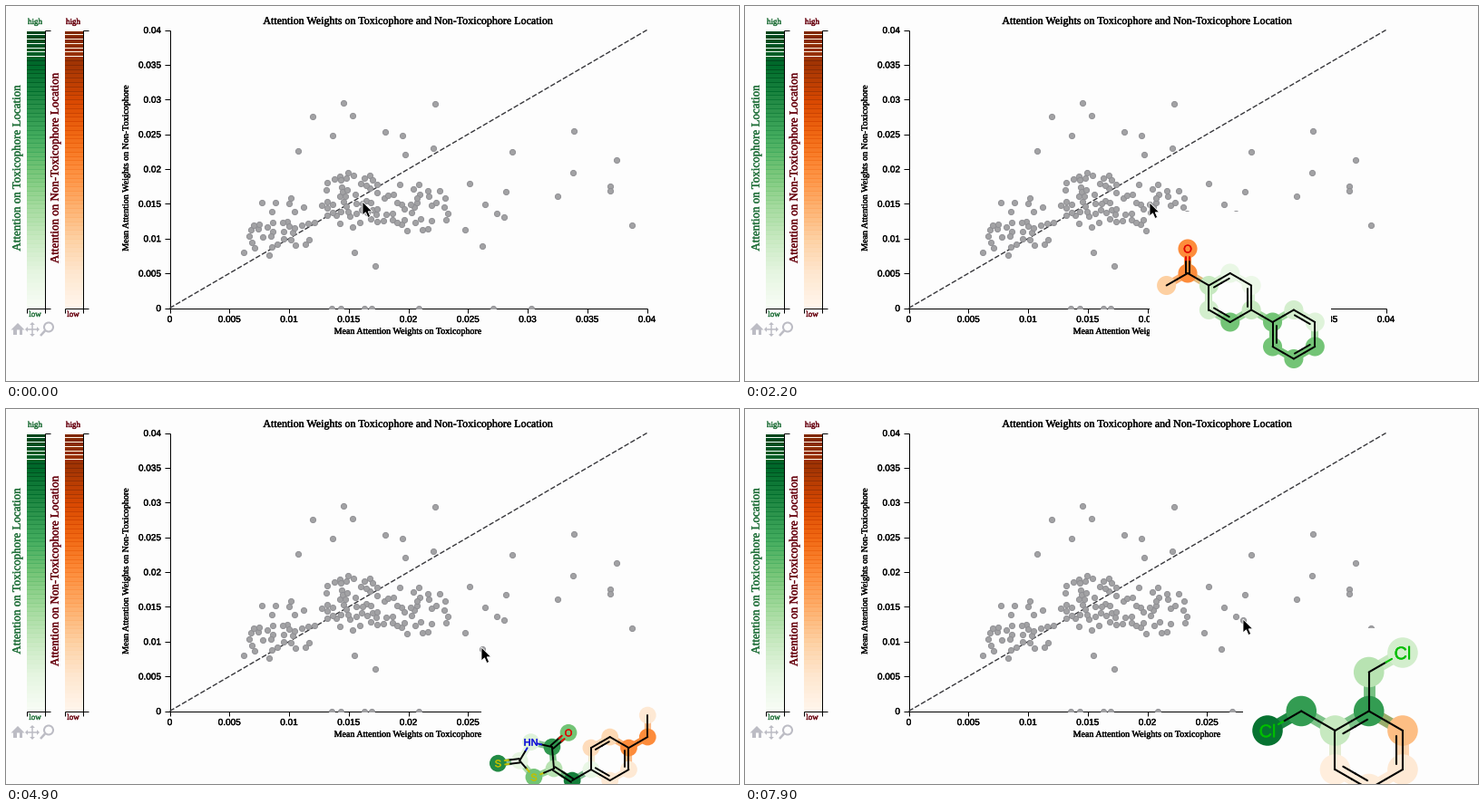
Write a matplotlib script that moves like this. It is 808 by 414 pixels and loops after 8000 ms.

```python
import numpy as np
import matplotlib.pyplot as plt
from matplotlib.animation import FuncAnimation
from matplotlib.patches import Circle, Ellipse, Polygon, Rectangle
from matplotlib.patheffects import withStroke

W, H, DPI = 808, 414, 72
FRAMES, STEP = 80, 100
PAPER = "#fdfdfd"
SERIF, SANS = "Liberation Serif", "Liberation Sans"
LEFT, RIGHT, TOP, BASE = 180.5, 706.5, 26.5, 333.5
GREENS, ORANGES = plt.get_cmap("Greens"), plt.get_cmap("Oranges")
plt.rcParams["text.hinting"] = "none"

fig = plt.figure(figsize=(W / DPI, H / DPI), dpi=DPI, facecolor=PAPER)
ax = fig.add_axes([0, 0, 1, 1])
ax.set_xlim(0, W)
ax.set_ylim(H, 0)
ax.axis("off")


def line(p, q, color="black", lw=1.0, z=2, **kw):
    kw.setdefault("solid_capstyle", "butt")
    return ax.plot([p[0], q[0]], [p[1], q[1]], color=color, lw=lw, zorder=z, **kw)[0]


def text(x, y, s, size, color="black", font=SERIF, ha="center", va="baseline", z=3, **kw):
    bolder = [withStroke(linewidth=0.35, foreground=color)]
    return ax.text(x, y, s, fontsize=size, color=color, family=font, ha=ha, va=va,
                   zorder=z, path_effects=bolder, **kw)


def patch(p, z):
    p.set_zorder(z)
    return ax.add_patch(p)


def heading(deg):
    a = np.radians(deg)
    return np.array([np.cos(a), -np.sin(a)])


# ---- colour bars ----
def color_bar(x, cmap, ink, label, label_x, bands=64):
    h = (BASE - TOP) / bands
    for i in range(bands):
        t = 1 - i / (bands - 1)
        y = TOP + i * h
        patch(Rectangle((x, y), 20, h + 0.4, fc=cmap(t), ec="none"), 1)
        patch(Rectangle((x, y), 20, 1, fc=cmap(min(1, t * 1.12)), ec="none"), 1.1)
    r = x + 20
    line((r, TOP), (r, BASE + 5))
    line((x, BASE), (x, BASE + 5))
    line((x, BASE), (r + 6, BASE))
    line((r, TOP), (r + 6, TOP))
    text(x + 9.5, 20, "high", 9, ink)
    text(x + 9.5, 343, "low", 9, ink)
    text(label_x, 179, label, 13, ink, va="center", rotation=90)


color_bar(22.5, GREENS, "#1f6f38", "Attention on Toxicophore Location", 12.5)
color_bar(64.5, ORANGES, "#67000d", "Attention on Non-Toxicophore Location", 54.5)

# ---- toolbar ----
TOOL = "#bcbcc4"
patch(Polygon([(5.5, 357.5), (13, 350), (20.5, 357.5)], fc=TOOL, ec="none"), 2)
for x in (8, 14.5):
    patch(Rectangle((x, 357), 3.5, 6, fc=TOOL, ec="none"), 2)
hub = np.array([29, 357])
for a in range(0, 360, 90):
    line(hub, hub + 7 * heading(a), TOOL, 1.5)
    patch(Polygon([hub + 8 * heading(a), hub + 5.8 * heading(a + 30),
                   hub + 5.8 * heading(a - 30)], fc=TOOL, ec="none"), 2)
patch(Circle((47, 354.5), 5, fc="none", ec=TOOL, lw=2), 2)
line((43, 358.5), (38, 364), TOOL, 2.5)

# ---- plot frame ----
text(443, 20, "Attention Weights on Toxicophore and Non-Toxicophore Location", 12)
text(443, 362, "Mean Attention Weights on Toxicophore", 10)
text(132.5, 179, "Mean Attention Weights on Non-Toxicophore", 10, va="center", rotation=90)
line((LEFT, TOP), (LEFT, BASE))
line((LEFT, BASE), (RIGHT, BASE))
for k in range(9):
    x = LEFT + (RIGHT - LEFT) * k / 8
    y = BASE + (TOP - BASE) * k / 8
    name = f"{0.005 * k:g}"
    line((x, BASE), (x, BASE + 5))
    line((LEFT - 6, y), (LEFT, y))
    text(x, 349, name, 10, font=SANS)
    text(171, y + 3.5, name, 10, font=SANS, ha="right")
line((LEFT, BASE), (RIGHT, TOP), "#38383c", 1.4, dashes=(4, 1.6), dash_capstyle="butt")

# ---- scatter: a few outliers, then seeded clouds ----
OUTLIERS = [
    (371, 106), (337, 121), (381, 120), (472, 107), (417, 138), (359, 142), (436, 142),
    (321, 159), (470, 156), (439, 163), (557, 160), (625, 137), (624, 183), (672, 169),
    (665, 198), (665, 203), (689, 241), (607, 209), (550, 204), (540, 228), (548, 232),
    (527, 218), (510, 195), (505, 246), (524, 264), (406, 286), (383, 271), (261, 271)]
ON_AXIS = [358, 368, 394, 402, 454, 536, 578]
# count, centre, radii
CLOUDS = [(36, 302, 244, 40, 34), (46, 380, 212, 33, 33), (40, 443, 222, 52, 27)]

rng = np.random.default_rng(11)
dots = [np.array(p) for p in OUTLIERS + [(x, 333) for x in ON_AXIS]]
for count, cx, cy, rx, ry in CLOUDS:
    while count:
        r = np.sqrt(rng.uniform())
        p = (cx, cy) + r * heading(rng.uniform(0, 360)) * (rx, ry)
        if min(np.hypot(*(p - q)) for q in dots) > 5:
            dots.append(p)
            count -= 1
dots = np.array(dots) + 0.5
cloud = ax.scatter(*dots.T, s=6.2 ** 2, fc="#a2a2a4", ec="#8e8e92", lw=0.9, zorder=4)
cloud.set_clip_path(Rectangle((LEFT, TOP), RIGHT - LEFT, BASE - TOP + 0.5,
                              transform=ax.transData))

# ---- molecules ----
INK = {"O": "#e00000", "N": "#1010d8", "NH": "#1010d8", "HN": "#1010d8",
       "N⁺": "#1010d8", "Cl": "#00be00", "Cl⁻": "#00be00", "S": "#c0c000"}


def tint(tone):
    """Positive attention is green, negative orange."""
    return np.array((GREENS if tone > 0 else ORANGES)(abs(tone)))


class Molecule:
    """Tooltip drawing, grown atom by atom along bond headings."""

    def __init__(self, tip, size, start, tone, label=""):
        self.size, self.pos, self.names, self.tones = size, [], [], []
        self.parts = [patch(Rectangle((tip[0], tip[1] + 10), 200, 200, fc=PAPER,
                                      ec="none"), 6)]
        self.atom(np.array(start, float), tone, label)

    def atom(self, p, tone, label):
        self.pos.append(p)
        self.names.append(label)
        self.tones.append(tone)
        r = 0.39 * self.size
        tall = label == "NH"
        halo = Ellipse((p[0], p[1] + 0.3 * self.size * tall), 2 * r, 2 * r * (1 + tall),
                       fc=tint(tone), ec="none")
        self.parts.append(patch(halo, 8))
        for k, s in enumerate(label if tall else [label]):
            self.parts.append(text(p[0], p[1] + 0.5 * self.size * k, s, 0.46 * self.size,
                                   INK.get(label, "black"), SANS, va="center_baseline",
                                   z=10))
        return len(self.pos) - 1

    def grow(self, i, deg, tone, label="", order=1):
        j = self.atom(self.pos[i] + self.size * heading(deg), tone, label)
        self.bond(i, j, order)
        return j

    def chain(self, i, *steps):
        for deg, tone in steps:
            i = self.grow(i, deg, tone)
        return i

    def ring(self, i, deg, turn, tones, labels=None, phase=None):
        """Closed walk from atom i; with a phase, every other bond is double."""
        ids = [i]
        for k, tone in enumerate(tones):
            step = self.size * heading(deg + turn * k)
            ids.append(self.atom(self.pos[ids[-1]] + step, tone, (labels or {}).get(k, "")))
        center = np.mean([self.pos[k] for k in ids], axis=0)
        for k, a in enumerate(ids):
            double = phase is not None and k % 2 == phase
            self.bond(a, ids[(k + 1) % len(ids)], inner=center if double else None)
        return ids

    def benzene(self, i, deg, tones, phase):
        return self.ring(i, deg + 60, -60, tones, phase=phase)

    def bond(self, i, j, order=1, inner=None):
        p, q = self.pos[i], self.pos[j]
        n = heading(90) if p[0] == q[0] else (q - p)
        n = (q - p)[::-1] * (-1, 1) * 0.13
        self.parts.append(line(p, q, (tint(self.tones[i]) + tint(self.tones[j])) / 2,
                               0.3 * self.size, 7))
        shifts = {1: [0], 2: [-0.7, 0.7], 3: [-1, 0, 1]}[order]
        for s in shifts:
            self.stroke(i, j, s * n)
        if inner is not None:
            side = np.sign(n @ (inner - (p + q) / 2))
            self.stroke(i, j, 1.3 * side * n, 0.14)

    def stroke(self, i, j, shift, trim=0.0):
        p, q = self.pos[i] + shift, self.pos[j] + shift
        mid = (p + q) / 2
        for end, k in ((p, i), (q, j)):
            cut = 0.32 if self.names[k] else trim
            self.parts.append(line(end + 2 * cut * (mid - end), mid,
                                   INK.get(self.names[k], "black"), 1.7 + self.size / 110,
                                   9, solid_capstyle="round"))


def carbamate(tip):
    m = Molecule(tip, 16.4, (392, 341), 0.65, "N⁺")
    for deg, tone in ((115, 0.3), (62, 0.3), (205, 0.15)):
        m.grow(0, deg, tone)
    m.atom(np.array([391, 357]), 0.08, "Cl⁻")
    c = m.chain(0, (-25, 0.15), (30, -0.35))
    c = m.grow(c, 30, -0.4, order=3)
    c = m.chain(c, (30, -0.4))
    c = m.grow(m.grow(c, -30, 0.5, "O"), 30, 0.25)
    m.grow(c, 90, 0.5, "O", order=2)
    c = m.grow(m.grow(c, -30, 0.65, "NH"), 30, -0.85)
    ids = m.benzene(c, 30, [-0.3, -0.4, -0.4, -0.4, -0.3], 0)
    m.grow(ids[4], -30, -0.4, "Cl")
    return m


def biphenyl(tip):
    m = Molecule(tip, 27, (488, 268), -0.5, "O")
    c = m.grow(0, -90, -0.5, order=2)
    m.grow(c, 210, -0.25)
    ids = m.benzene(m.grow(c, -30, 0.25), -30, [0.1, 0.08, 0.25, 0.5, 0.2], 0)
    m.benzene(m.grow(ids[3], -30, 0.5), -30, [0.2, 0.15, 0.5, 0.5, 0.5], 1)
    return m


def chloride(tip):
    m = Molecule(tip, 43.5, (642, 337.5), 0.55)
    m.grow(0, 90, 0.42, "O", order=2)
    m.grow(0, -30, 0.42, "Cl")
    n = m.grow(0, 210, 0.58, "N")
    m.chain(n, (150, 0.42), (210, -0.3))
    m.chain(n, (-90, 0.82), (210, -0.1))
    return m


def thiazole(tip):
    m = Molecule(tip, 24, (604, 397), 0.3)
    ids = m.ring(0, 95, 72, [0.7, 0.15, 0.12, 0.5], {1: "HN", 3: "S"})
    m.grow(ids[1], 41, 0.5, "O", order=2)
    m.grow(ids[3], 187, 0.75, "S", order=2)
    c = m.grow(0, -33, 0.8, order=2)
    ring = m.benzene(m.grow(c, 30, 0.1), 30, [-0.18, -0.2, -0.5, -0.1, -0.1], 1)
    m.chain(ring[3], (30, -0.5), (90, -0.1))
    return m


def nitrile(tip):
    m = Molecule(tip, 31, (558.5, 377), 0.52, "N")
    c = m.chain(m.grow(0, 30, 0.45, order=3), (30, 0.7))
    c = m.chain(m.grow(c, -30, 0.22, order=2), (30, -0.45))
    m.benzene(c, 30, [-0.25, -0.12, -0.08, -0.22, -0.08], 1)
    return m


def xylene(tip):
    m = Molecule(tip, 43, (576, 355), 0.85, "Cl")
    c = m.chain(0, (30, 0.68), (-30, 0.25))
    ids = m.benzene(c, -30, [0.68, -0.32, -0.1, -0.08, -0.06], 0)
    m.grow(m.chain(ids[1], (90, 0.3)), 30, 0.2, "Cl")
    return m


# drawing, pointer tip, first and last step of the hover
VISITS = [
    (None, (393, 216), 0, 1), (carbamate, (363, 217), 6, 15),
    (biphenyl, (446, 217), 19, 25), (chloride, (505, 248), 29, 39),
    (thiazole, (524, 263), 46, 51), (nitrile, (539, 228), 55, 63),
    (xylene, (549, 232), 65, FRAMES)]
TOOLTIPS = [(make(tip).parts, a, b) for make, tip, a, b in VISITS if make]

# ---- pointer ----
ARROW = np.array([(0, 0), (0, 15), (3.5, 11.8), (6, 17.5), (8.6, 16.3), (6.2, 10.8),
                  (10.8, 10.8)])
pointer = patch(Polygon(ARROW, fc="black", ec="white", lw=0.8), 20)


def pointer_at(i):
    spot = np.array(VISITS[0][1], float)
    for (_, p, _, leave), (_, q, arrive, _) in zip(VISITS, VISITS[1:]):
        u = np.clip((i - leave) / (arrive - leave), 0, 1)
        spot += np.subtract(q, p) * u * u * (3 - 2 * u)
    return spot


def update(i):
    pointer.set_xy(ARROW + pointer_at(i))
    for parts, start, end in TOOLTIPS:
        for p in parts:
            p.set_visible(start <= i < end)
    return [pointer]


anim = FuncAnimation(fig, update, frames=FRAMES, interval=STEP, repeat=True,
                     repeat_delay=0, init_func=lambda: update(0))
plt.show()
```
